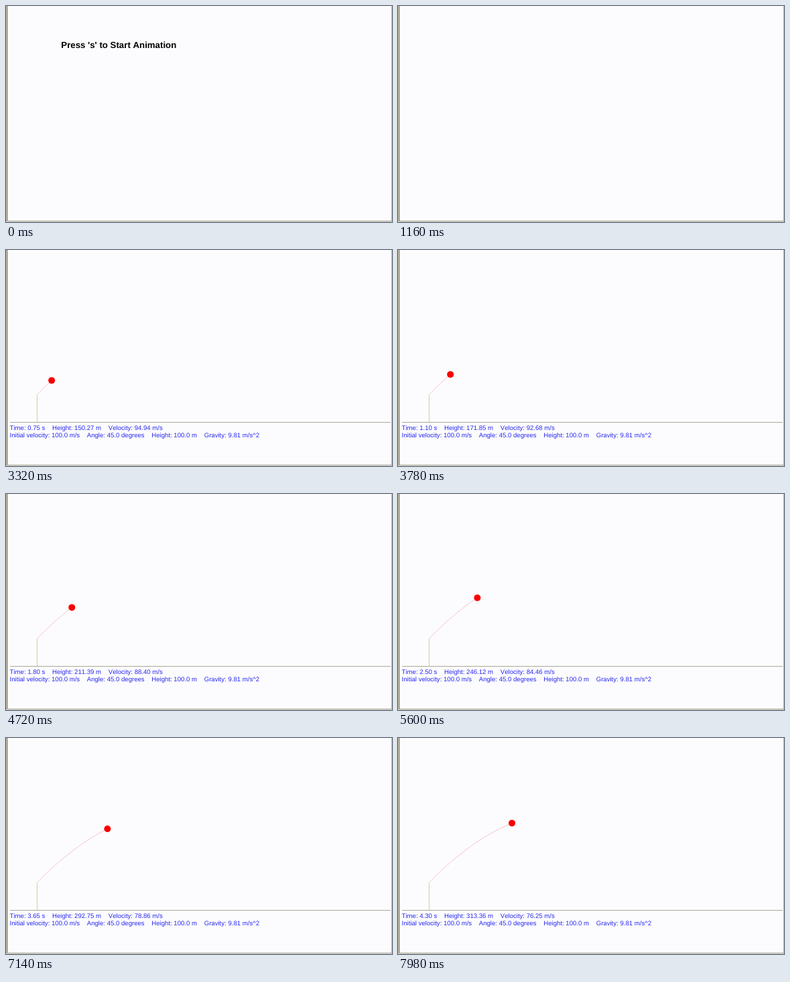
An HTML page with a canvas for the animation above (8 s loop, 576 px wide and 324 px high).

```html
<!DOCTYPE html>
<html>
<head>
<meta charset="utf-8">
<title>Projectile</title>
<style>
html, body { margin: 0; width: 100%; height: 100%; overflow: hidden; background: #fcfcfe; }
canvas { display: block; }
</style>
</head>
<body>
<canvas id="stage" width="576" height="324"></canvas>
<script>
const ctx = document.getElementById('stage').getContext('2d');
const LOOP = 8000, PROMPT_END = 1120, LAUNCH = 2300;
const TICK = 65.6, STEP = 0.05;
const SPEED = 100, ANGLE = 45, HEIGHT = 100, GRAVITY = 9.81;
const V0 = SPEED * Math.sin(ANGLE * Math.PI / 180);
const VX = SPEED * Math.cos(ANGLE * Math.PI / 180);

const heightAt = t => HEIGHT + V0 * t - GRAVITY * t * t / 2;
const screenX = metres => 46.6 + 0.406 * metres;
const screenY = metres => 258.3 - 0.417 * metres;

function rect(color, x, y, w, h) {
  ctx.fillStyle = color;
  ctx.fillRect(x, y, w, h);
}

function text(str, x, y, font, color) {
  ctx.font = font + ' "Liberation Sans", Arial, sans-serif';
  ctx.fontKerning = 'none';
  ctx.textRendering = 'geometricPrecision';
  ctx.fillStyle = color;
  ctx.fillText(str, x, y);
}

function drawWindow() {
  rect('#fcfcfe', 0, 0, 576, 324);
  rect('#d6d3c2', 0, 0, 1, 324);
  rect('#77745f', 1, 0, 1, 324);
  rect('#d9d6bc', 2, 0, 1, 324);
  rect('#b4b2a8', 575, 0, 1, 324);
  rect('#aaa89a', 0, 322, 576, 1);
  rect('#dcdad0', 0, 323, 576, 1);
}

function drawFlight(t) {
  const h = heightAt(t);
  const v = Math.hypot(VX, V0 - GRAVITY * t);

  rect('#aaa898', 6, 258, 568, 1);
  rect('#d2d292', 46, 217, 1, 41);

  ctx.beginPath();
  for (let s = 0; s <= t + 1e-6; s += STEP) ctx.lineTo(screenX(VX * s), screenY(heightAt(s)));
  ctx.strokeStyle = '#f6b6c0';
  ctx.lineWidth = 0.9;
  ctx.stroke();

  ctx.beginPath();
  ctx.arc(screenX(VX * t), screenY(h), 5, 0, 2 * Math.PI);
  ctx.fillStyle = '#f80000';
  ctx.fill();

  const gap = '    ';
  const status = [`Time: ${t.toFixed(2)} s`, `Height: ${h.toFixed(2)} m`, `Velocity: ${v.toFixed(2)} m/s`];
  const setup = [`Initial velocity: ${SPEED.toFixed(1)} m/s`, `Angle: ${ANGLE.toFixed(1)} degrees`,
    `Height: ${HEIGHT.toFixed(1)} m`, `Gravity: ${GRAVITY} m/s^2`];
  text(status.join(gap), 5.6, 270, '9.6px', '#2828f0');
  text(setup.join(gap), 5.6, 281, '9.6px', '#2828f0');
}

function draw() {
  const now = performance.now() % LOOP;
  drawWindow();
  if (now < PROMPT_END) text("Press 's' to Start Animation", 82.3, 63, 'bold 13.25px', '#000');
  if (now >= LAUNCH) drawFlight(Math.floor((now - LAUNCH) / TICK) * STEP);
  requestAnimationFrame(draw);
}
draw();
</script>
</body>
</html>
```
